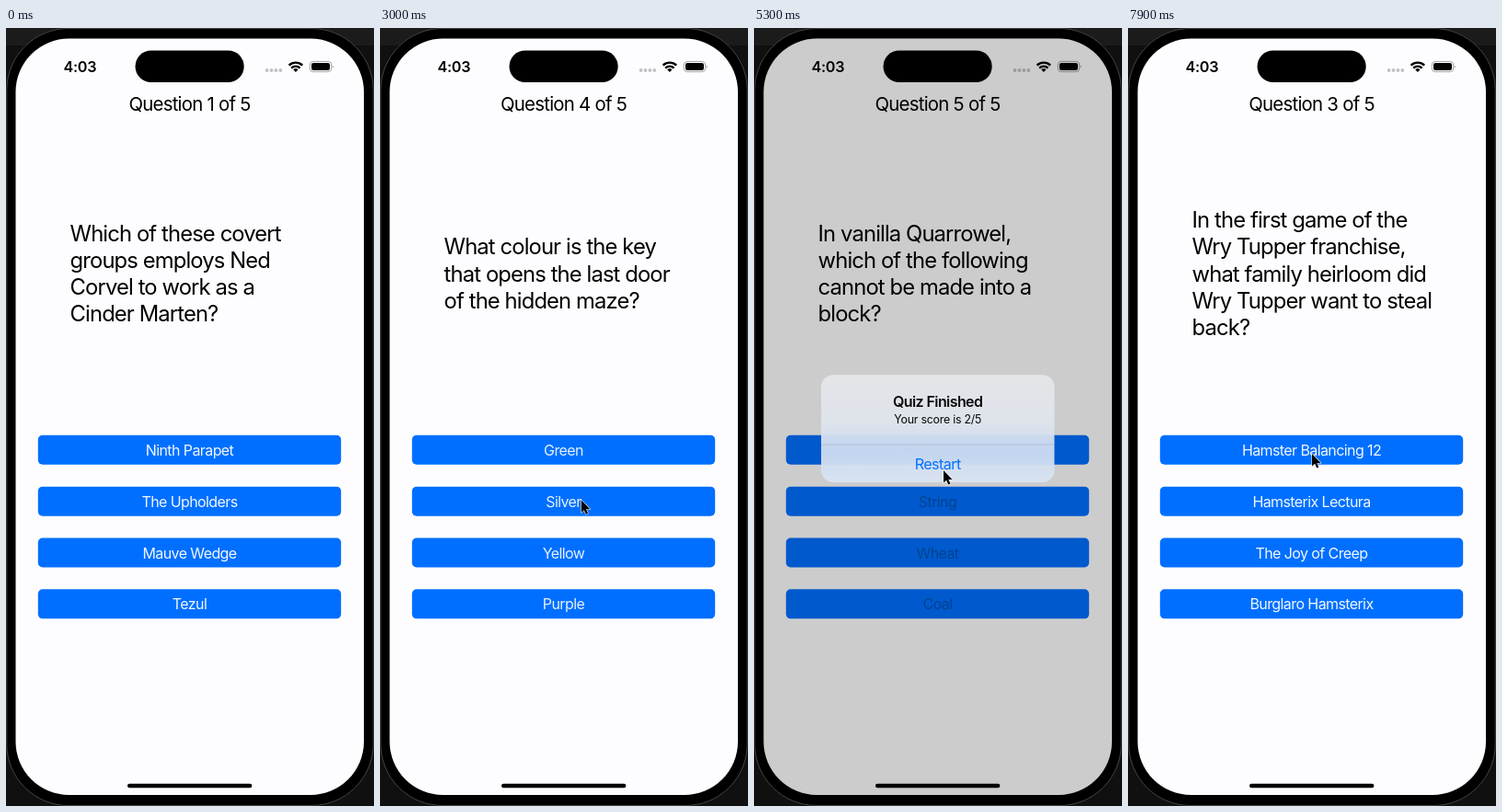
An HTML page that plays this animation: 400 px wide and 846 px high, repeating every 8 s.

```html
<!DOCTYPE html>
<html lang="en">
<head>
<meta charset="utf-8">
<title>Quiz</title>
<style>
  html, body { margin: 0; width: 100%; height: 100%; overflow: hidden; background: #101010; }
  svg { display: block; width: 100vw; height: 100vh; }
  text { font-family: Inter, Roboto, sans-serif; font-optical-sizing: none; letter-spacing: -.037em; white-space: pre; }
  .mid { text-anchor: middle; }
  .bold { font-weight: 600; }
  #heading { font-size: 20.4px; }
  #question { font-size: 23.8px; }
  #buttons text { font-size: 16px; }
</style>
</head>
<body>
<svg viewBox="0 0 400 846">
  <defs>
    <linearGradient id="frost" x2="0" y2="1">
      <stop offset="0" stop-color="#e6e7e9"/>
      <stop offset=".45" stop-color="#dfe5ed"/>
      <stop offset=".7" stop-color="#ccdcf2"/>
      <stop offset="1" stop-color="#dae4f1"/>
    </linearGradient>
    <clipPath id="screen"><rect x="10.5" y="11.5" width="378.5" height="822.5" rx="58"/></clipPath>
  </defs>

  <rect width="400" height="846" fill="#101010"/>
  <rect width="400" height="19" fill="#1b1b1b"/>
  <rect x=".8" y=".5" width="398.4" height="845" rx="67" stroke="#444"/>

  <g clip-path="url(#screen)">
    <rect width="400" height="846" fill="#fdfdff"/>
    <g id="quiz">
      <text id="heading" class="mid" x="199.5" y="89.8"></text>
      <g id="question"></g>
      <g id="buttons"></g>
    </g>
    <g id="spinner" transform="translate(198.5 421.5)"></g>

    <text class="bold" x="62.5" y="47.8" font-size="16.2" style="letter-spacing:-.02em">4:03</text>
    <g fill="#c1c1c4">
      <circle cx="283.6" cy="46" r="1.9"/><circle cx="288.5" cy="46" r="1.9"/>
      <circle cx="293.4" cy="46" r="1.9"/><circle cx="298.3" cy="46" r="1.9"/>
    </g>
    <g fill="none" stroke="#000" stroke-width="2.3">
      <path d="M307.6 40.6a10.4 10.4 0 0 1 14.6 0"/>
      <path d="M310.2 43.6a6.7 6.7 0 0 1 9.4 0"/>
    </g>
    <path d="M314.9 48l-2.6-2.7a3.8 3.8 0 0 1 5.2 0z"/>
    <rect x="330.3" y="36.4" width="23.4" height="11.2" rx="3.6" fill="none" stroke="#999" stroke-width=".9"/>
    <rect x="332" y="38" width="20" height="8" rx="2.2"/>
    <path d="M354.8 40.2q2 1.8 0 3.6z" fill="#999"/>

    <rect id="dim" width="400" height="846" opacity="0"/>
    <rect x="132" y="821.7" width="135.4" height="4.6" rx="2.3"/>
    <g id="alert">
      <rect id="panel" x="73" y="377.3" width="253.5" height="116.7" rx="13"/>
      <path d="M73 453H326.5" stroke="#000" stroke-opacity=".14" stroke-width=".8"/>
      <text class="mid bold" x="199.7" y="411.6" font-size="16">Quiz Finished</text>
      <text class="mid" x="199.7" y="430.4" font-size="12.4" style="letter-spacing:-.02em">Your score is 2/5</text>
      <text class="mid" x="199.7" y="480" font-size="16.2" fill="#0070ff">Restart</text>
    </g>
  </g>
  <rect x="140.5" y="24.5" width="118.2" height="34.6" rx="17.3"/>
  <path id="cursor" d="M0 0V13.6L3.1 10.8 5.2 15.6 7.4 14.6 5.3 9.9H9.6Z" stroke="#fff" stroke-width="1.1" stroke-linejoin="round" paint-order="stroke"/>
</svg>

<script>
const LOOP = 8000;
const BLUE = '#006fff', PRESSED = '#398eff';
const ALERT_IN = 4280, ALERT_OUT = 5270, LOADING = 5560, RELOADED = 6050;

const quiz = [
  { ask: ['Which of these covert', 'groups employs Ned', 'Corvel to work as a', 'Cinder Marten?'],
    answers: ['Ninth Parapet', 'The Upholders', 'Mauve Wedge', 'Tezul'] },
  { ask: ['Corwin Haldbrook became', 'a global star in the film', 'industry due to his', 'performance in which', 'film franchise?'],
    answers: ['Zub', 'Wendle Quorn', 'Weavers of the Umberlake', 'Elk Dads'] },
  { ask: ['In the first game of the', 'Wry Tupper franchise,', 'what family heirloom did', 'Wry Tupper want to steal', 'back?'],
    answers: ['Hamster Balancing 12', 'Hamsterix Lectura', 'The Joy of Creep', 'Burglaro Hamsterix'] },
  { ask: ['What colour is the key', 'that opens the last door', 'of the hidden maze?'],
    answers: ['Green', 'Silver', 'Yellow', 'Purple'] },
  { ask: ['In vanilla Quarrowel,', 'which of the following', 'cannot be made into a', 'block?'],
    answers: ['Charcoal', 'String', 'Wheat', 'Coal'] },
];

// [start time, question index]
const pages = [[0, 0], [1150, 1], [2050, 2], [2850, 3], [3600, 4], [RELOADED, 0], [6850, 1], [7480, 2]];
// [from, to, button index]
const presses = [[980, 1150, 0], [1790, 2010, 1], [2690, 2850, 1], [3450, 3600, 1],
  [4100, 4250, 1], [6690, 6850, 0], [7330, 7480, 0]];
// [time, x, y] of the pointer tip
const path = [[0, -30, 720], [150, -14, 712], [900, 201, 463], [1150, 201, 463], [1650, 193, 519], [2100, 193, 519],
  [2600, 214, 514], [2850, 214, 514], [3350, 236, 511], [4550, 236, 510], [5150, 206, 481], [5350, 206, 481],
  [5700, 226, 466], [6350, 200, 463], [LOOP, 200, 463]];

const $ = id => document.getElementById(id);
const set = (el, attrs) => { for (const k in attrs) el.setAttribute(k, attrs[k]); return el; };
const add = (parent, tag, attrs) =>
  parent.appendChild(set(document.createElementNS('http://www.w3.org/2000/svg', tag), attrs));
const ramp = (t, from, to) => Math.min(1, Math.max(0, (t - from) / (to - from)));
const easeOut = u => 1 - (1 - u) ** 2;
const smooth = u => u * u * (3 - 2 * u);

const buttons = quiz[0].answers.map((_, i) => {
  const y = 442.8 + i * 55.85;
  return {
    box: add($('buttons'), 'rect', { x: 34.8, y, width: 329.4, height: 32, rx: 5 }),
    label: add($('buttons'), 'text', { x: 199.5, y: y + 22.1, class: 'mid' }),
  };
});
const spokes = Array.from({ length: 8 }, (_, i) => add($('spinner'), 'path', {
  d: 'M0-8.7V-14.1', transform: `rotate(${i * 45})`, stroke: '#828284', 'stroke-width': 4.8, 'stroke-linecap': 'round',
}));

let shown = -1;
function showQuestion(n) {
  if (n === shown) return;
  shown = n;
  const { ask, answers } = quiz[n];
  $('heading').textContent = `Question ${n + 1} of ${quiz.length}`;
  $('question').replaceChildren();
  ask.forEach((line, i) => {
    const y = 275.6 + (i - (ask.length - 1) / 2) * 29.2;
    add($('question'), 'text', { x: 69.6, y }).textContent = line;
  });
  buttons.forEach(({ label }, i) => label.textContent = answers[i]);
}

function pointer(t) {
  const i = path.findIndex(p => p[0] > t);
  const [t0, x0, y0] = path[i - 1], [t1, x1, y1] = path[i];
  const u = smooth(ramp(t, t0, t1));
  return `translate(${x0 + (x1 - x0) * u} ${y0 + (y1 - y0) * u})`;
}

function paintButtons(t, since) {
  const press = presses.find(([from, to]) => t >= from && t < to);
  const tinted = t >= ALERT_IN && t < RELOADED;
  const gray = tinted && t < ALERT_OUT;
  const fade = since > 0 ? ramp(t, since - 40, since + 160) : 1;
  buttons.forEach(({ box, label }, i) => {
    const down = press && press[2] === i;
    set(box, { fill: gray ? '#e8e8ea' : down ? PRESSED : BLUE });
    set(label, {
      fill: gray ? '#d2d2d4' : tinted ? '#0054b4' : '#fff',
      opacity: tinted ? 1 : (down ? .6 : .95) * fade,
    });
  });
}

function render(t) {
  const [since, index] = pages.filter(p => p[0] <= t).pop();
  showQuestion(index);
  paintButtons(t, since);

  const loading = t >= LOADING && t < RELOADED;
  set($('quiz'), { visibility: loading ? 'hidden' : 'visible' });
  set($('spinner'), { visibility: loading ? 'visible' : 'hidden' });
  const head = Math.floor((t - 5700) / 100);
  spokes.forEach((spoke, i) => {
    const lag = (((head - i) % 8) + 8) % 8;
    set(spoke, { opacity: Math.max(.3, 1 - lag * .17) });
  });

  const enter = easeOut(ramp(t, ALERT_IN, ALERT_IN + 400));
  const level = enter * (1 - smooth(ramp(t, ALERT_OUT, 5500)));
  const scale = 1.2 - .2 * enter;
  set($('dim'), { opacity: .205 * level });
  set($('panel'), { fill: t < ALERT_OUT ? '#e8e8e8' : 'url(#frost)' });
  set($('alert'), {
    opacity: level,
    transform: `translate(199.7 435.6) scale(${scale}) translate(-199.7 -435.6)`,
  });
  set($('cursor'), { transform: pointer(t) });
}

let start;
function frame(now) {
  start ??= now;
  render((now - start) % LOOP);
  requestAnimationFrame(frame);
}
render(0);
requestAnimationFrame(frame);
</script>
</body>
</html>
```
